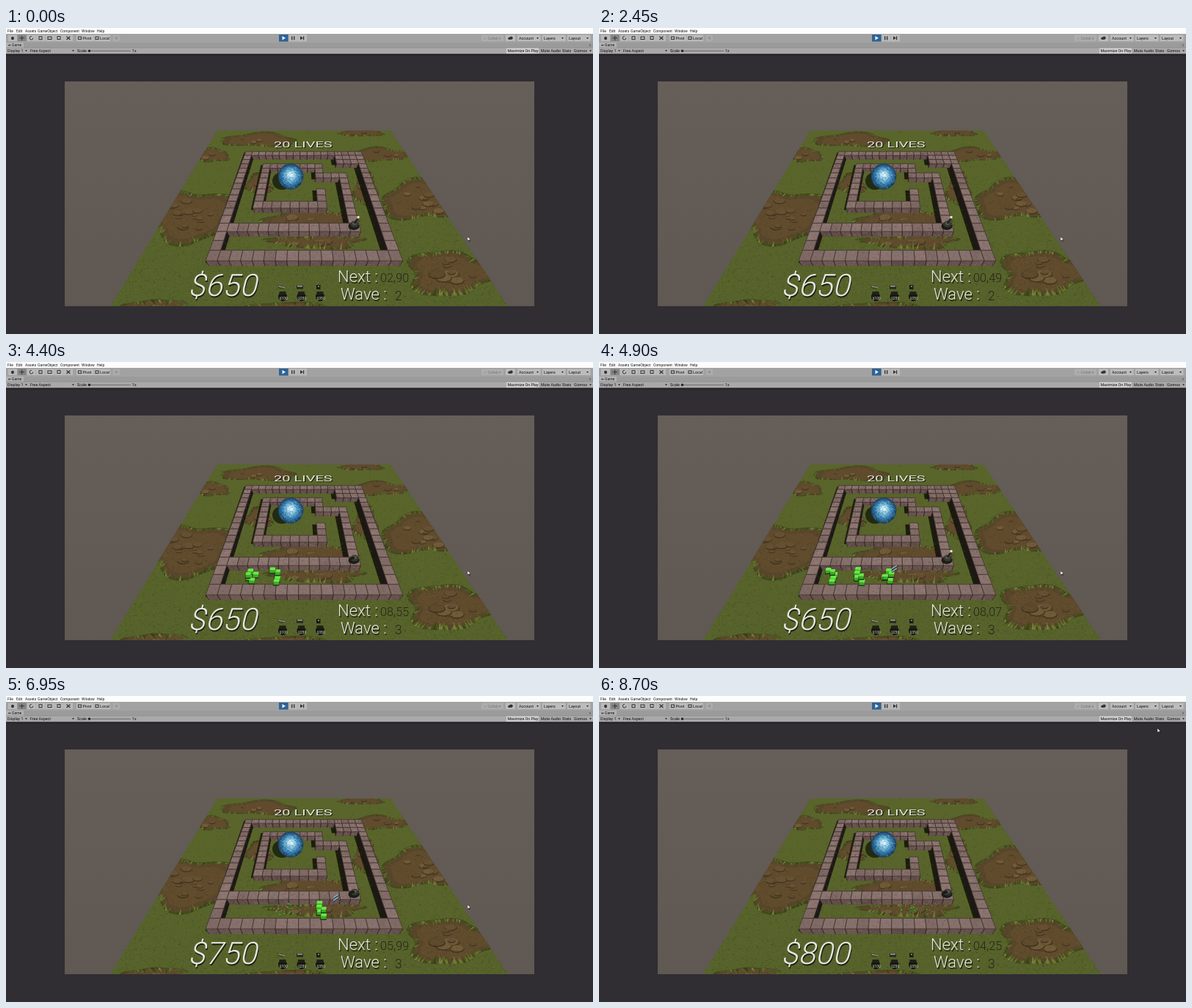
Write an HTML page with a canvas that moves like this. It is 800 by 418 pixels and loops after 8.75 s.

```html
<!DOCTYPE html>
<html lang="en">
<head>
<meta charset="utf-8">
<title>Tower defence in the editor</title>
<style>
html, body { margin: 0; width: 100%; height: 100%; overflow: hidden; background: #302e32; }
canvas { display: block; }
</style>
</head>
<body>
<canvas id="stage" width="800" height="418"></canvas>
<script>
(() => {
const LOOP = 8750, STEP = 50;
const view = document.getElementById('stage').getContext('2d');
const scene = document.createElement('canvas');
scene.width = 800;
scene.height = 418;
let g = scene.getContext('2d');

function seeded(n) {
  return () => {
    n = (n + 0x6d2b79f5) | 0;
    let k = Math.imul(n ^ (n >>> 15), 1 | n);
    k = (k + Math.imul(k ^ (k >>> 7), 61 | k)) ^ k;
    return ((k ^ (k >>> 14)) >>> 0) / 4294967296;
  };
}
const pick = (rnd, list) => list[Math.floor(rnd() * list.length)];

function box(x, y, w, h, fill) {
  g.fillStyle = fill;
  g.fillRect(x, y, w, h);
}
function poly(points, fill) {
  g.beginPath();
  points.forEach(p => g.lineTo(p[0], p[1]));
  g.closePath();
  g.fillStyle = fill;
  g.fill();
}
function oval(x, y, rx, ry, fill) {
  g.beginPath();
  g.ellipse(x, y, rx, ry, 0, 0, 7);
  g.fillStyle = fill;
  g.fill();
}
function line(x1, y1, x2, y2, color, width = 1) {
  g.beginPath();
  g.moveTo(x1, y1);
  g.lineTo(x2, y2);
  g.strokeStyle = color;
  g.lineWidth = width;
  g.stroke();
}
function label(s, x, y, size = 5, color = '#111', weight = 400) {
  g.font = `${weight} ${size}px Roboto, "Open Sans", sans-serif`;
  g.fillStyle = color;
  g.fillText(s, x, y);
}

// Linear value at time t through [time, value] pairs.
function along(keys, t) {
  if (t <= keys[0][0]) return keys[0][1];
  for (let i = 1; i < keys.length; i++) {
    const [t1, v1] = keys[i], [t0, v0] = keys[i - 1];
    if (t <= t1) return v0 + (v1 - v0) * (t - t0) / (t1 - t0);
  }
  return keys[keys.length - 1][1];
}

/* ---- editor window ---- */
function drawEditor() {
  box(0, 0, 800, 418, '#302e32');
  box(0, 0, 800, 8, '#fdfdfd');
  [['File', 2], ['Edit', 14], ['Assets', 26], ['GameObject', 43], ['Component', 74],
   ['Window', 103], ['Help', 124]].forEach(([s, x]) => label(s, x, 5.8));

  box(0, 8, 800, 12, '#a2a2a2');
  box(0, 20, 800, 7, '#9b9b9b');
  box(0, 20, 24, 7, '#b2b2b2');
  label('Game', 8, 25.4);
  line(3, 23.5, 6.5, 23.5, '#444', 1.5);
  line(796, 22, 796, 25, '#555');

  for (let i = 0; i < 6; i++) box(3 + i * 12.7, 9.5, 12.2, 8.5, i === 1 ? '#858585' : '#b9b9b9');
  oval(9, 14, 2, 2.3, '#333');
  line(18.5, 13.7, 25, 13.7, '#333');
  line(21.7, 10.8, 21.7, 17, '#333');
  g.beginPath();
  g.arc(34.5, 13.7, 2.3, 0, 5);
  g.stroke();
  g.strokeRect(45, 11.7, 4, 4);
  g.strokeRect(57, 12, 5, 3.5);
  g.strokeRect(70, 11.5, 4, 4);
  box(79, 9.5, 12, 8.5, '#b9b9b9');
  line(82.5, 16, 87.5, 11.5, '#333', 1.2);
  line(82.5, 11.5, 87.5, 16, '#333', 1.2);
  box(96, 9.5, 23, 8.5, '#bcbcbc');
  box(119.5, 9.5, 22.5, 8.5, '#bcbcbc');
  g.strokeStyle = '#444';
  g.strokeRect(98.5, 12, 4, 3.5);
  g.strokeRect(122, 12, 4, 3.5);
  label('Pivot', 104.5, 15.7, 5.4);
  label('Local', 128, 15.7, 5.4);
  box(146, 9.5, 9, 8.5, '#acacac');
  oval(150.5, 13.7, 2, 2, '#969696');

  box(372, 9, 12.6, 9.5, '#2f6294');
  box(385, 9, 12, 9.5, '#b9b9b9');
  box(397.5, 9, 12.5, 9.5, '#b9b9b9');
  poly([[376.5, 11], [381, 13.7], [376.5, 16.4]], '#e9f3ff');
  box(389, 11.3, 1.4, 5, '#333');
  box(392, 11.3, 1.4, 5, '#333');
  poly([[401, 11.3], [405, 13.7], [401, 16.2]], '#333');
  box(405, 11.3, 1.2, 5, '#333');

  box(648, 9.5, 30, 8.5, '#adadad');
  label('✓ Collab ▾', 651, 15.5, 5, '#777');
  box(681, 9.5, 13, 8.5, '#bcbcbc');
  oval(686.3, 14.3, 2.2, 1.7, '#333');
  oval(688.5, 13.6, 2.2, 2.2, '#333');
  [['Account', 697], ['Layers', 731], ['Layout', 765]].forEach(([s, x]) => {
    box(x, 9.5, 31.5, 8.5, '#bcbcbc');
    label(s, x + 2, 15.7, 5.4);
    poly([[x + 26, 13], [x + 29, 13], [x + 27.5, 15]], '#222');
  });

  box(0, 27, 800, 8.5, '#a9a9a9');
  line(0, 27, 800, 27, '#858585', 0.6);
  box(682, 27.5, 44, 7.5, '#d0d0d0');
  [['Display 1', 2], ['Free Aspect', 33], ['Scale', 97], ['1x', 172], ['Maximize On Play', 683.5],
   ['Mute Audio', 729], ['Stats', 758], ['Gizmos', 774]].forEach(([s, x]) => label(s, x, 33, 5.3));
  [26, 90, 795].forEach(x => poly([[x, 30.3], [x + 3, 30.3], [x + 1.5, 32.3]], '#222'));
  line(112, 31.3, 170, 31.3, '#666', 0.9);
  oval(113.5, 31.3, 1.7, 1.7, '#222');
  box(0, 35.5, 800, 2, '#252327');
}

/* ---- ground ---- */
const GRASS = ['#45511d', '#68752f', '#768239', '#374116', '#55622a'];

function patch(rnd, x, y, rx, ry) {
  const near = 0.45 + (y - 140) / 230;
  const edge = a => 1 + 0.13 * Math.sin(3 * a + x) + 0.09 * Math.sin(5 * a + y);
  const at = (a, k) => [x + Math.cos(a) * rx * edge(a) * k, y + Math.sin(a) * ry * edge(a) * k];
  const ring = k => Array.from({ length: 60 }, (_, i) => at(i * Math.PI / 30, k));
  poly(ring(1.08), '#414a1d');
  poly(ring(1), '#58462a');
  poly(ring(0.82), '#604b2d');
  for (let i = 0; i < rx * ry / 130; i++) {
    const [px, py] = at(rnd() * 6.3, rnd() * 0.7);
    const w = (3 + rnd() * 7) * near, h = w * 0.5;
    oval(px, py + 1, w, h, '#453621');
    oval(px, py, w * 0.9, h * 0.85, pick(rnd, ['#665033', '#705a38', '#5e4a2c']));
  }
  const blades = Math.round((rx + ry) * 1.7);
  for (let i = 0; i < blades; i++) {
    const a = rnd() * 6.283, [px, py] = at(a, 1.06);
    const len = (4 + rnd() * 7) * near;
    const lean = -Math.cos(a) * len * 0.6 + (rnd() - 0.5) * len;
    const rise = -Math.sin(a) * len * 0.75 - len * 0.15;
    const w = 0.9 * near + 0.4;
    poly([[px - w, py], [px + lean, py + rise], [px + w, py + 0.5]], pick(rnd, GRASS));
  }
}

function drawGround() {
  const rnd = seeded(12);
  g.save();
  g.beginPath();
  [[288, 140], [524, 140], [684, 380], [142, 380]].forEach(p => g.lineTo(...p));
  g.clip();
  const shade = g.createLinearGradient(0, 140, 0, 380);
  shade.addColorStop(0, '#59652a');
  shade.addColorStop(1, '#56622b');
  box(140, 140, 545, 240, shade);
  [[345, 153, 48, 9], [283, 174, 20, 9], [510, 173, 36, 9], [484, 143, 28, 5],
   [248, 256, 58, 34], [566, 236, 52, 25], [415, 262, 62, 13], [425, 292, 60, 9],
   [605, 335, 56, 29], [490, 220, 15, 22], [345, 213, 17, 14], [205, 381, 38, 10],
   [390, 385, 75, 9]].forEach(p => patch(rnd, ...p));

  for (let i = 0; i < 7000; i++) {
    const y = 140 + 240 * Math.sqrt(rnd()), x = 140 + 545 * rnd();
    box(x, y, 1 + rnd(), 0.6 + rnd() * 0.6, rnd() < 0.55 ? 'rgba(24,27,4,.17)' : 'rgba(150,160,76,.15)');
  }
  g.restore();
}

/* ---- walls ---- */
const MAZE = [[0, 16, 0, 0], [0, 0, 0, 16], [16, 16, 0, 16], [0, 16, 16, 16], [13, 15, 1, 2],
  [3, 10, 3, 3], [3, 3, 3, 10], [10, 10, 3, 5], [10, 13, 5, 5], [13, 13, 5, 13],
  [1, 13, 13, 13], [3, 10, 10, 10], [10, 10, 8, 10]];
const solid = new Set();
MAZE.forEach(([c0, c1, r0, r1]) => {
  for (let c = c0; c <= c1; c++) for (let r = r0; r <= r1; r++) solid.add(c + ',' + r);
});
const isWall = (c, r) => solid.has(c + ',' + r);

function crest(c, r) {
  const d = 8640 / (41 - r);
  return [404 + (c - 8.34) * d * 0.04394, d - 42];
}
function foot(c, r) {
  const [x, y] = crest(c, r);
  return [404 + (x - 404) * 0.965, y + 3.5 + (y + 42) * 0.01];
}
function cell(c, r, at, dx = 0, dy = 0) {
  return [at(c, r), at(c + 1, r), at(c + 1, r + 1), at(c, r + 1)].map(([x, y]) => [x + dx, y + dy]);
}

function speckle(rnd, quad, n, alpha) {
  const [a, b, c, d] = quad;
  for (let i = 0; i < n; i++) {
    const u = 0.08 + rnd() * 0.8, v = 0.1 + rnd() * 0.7;
    const mix = k => (a[k] * (1 - u) + b[k] * u) * (1 - v) + (d[k] * (1 - u) + c[k] * u) * v;
    box(mix(0), mix(1), 1.3, 0.9, rnd() < 0.5 ? `rgba(40,22,20,${alpha})` : `rgba(205,172,164,${alpha})`);
  }
}
function drawWalls() {
  const rnd = seeded(5);
  const cells = [...solid].map(k => k.split(',').map(Number));
  cells.forEach(([c, r]) => poly(cell(c, r, foot, -5, -4), 'rgba(15,16,6,.85)'));
  cells.sort((a, b) => a[1] - b[1] || Math.abs(b[0] - 8) - Math.abs(a[0] - 8));
  cells.forEach(([c, r]) => {
    const side = c < 8 ? 1 : -1, edge = c < 8 ? c + 1 : c;
    if (!isWall(c + side, r)) {
      poly([crest(edge, r), crest(edge, r + 1), foot(edge, r + 1), foot(edge, r)], '#1d1816');
    }
    if (!isWall(c, r + 1)) {
      const front = [crest(c, r + 1), crest(c + 1, r + 1), foot(c + 1, r + 1), foot(c, r + 1)];
      poly(front, pick(rnd, ['#66514e', '#6d5753', '#604c49']));
      speckle(rnd, front, 9, 0.22);
      line(...front[0], ...front[3], '#2c2220', 0.8);
      line(...front[1], ...front[2], '#2c2220', 0.8);
    }
    const face = cell(c, r, crest);
    poly(face, pick(rnd, ['#85706b', '#8b746f', '#7f6964']));
    speckle(rnd, face, 14, 0.2);
    g.strokeStyle = '#41332f';
    g.lineWidth = 0.8;
    g.stroke(new Path2D('M' + face.map(p => p.join(' ')).join('L') + 'Z'));
  });
}

function drawSphere() {
  const rnd = seeded(31);
  oval(376, 209, 13, 12, 'rgba(14,20,7,.72)');
  const glow = g.createRadialGradient(388, 200, 1, 388, 203, 17.5);
  [[0, '#e3f8ff'], [0.22, '#a6dcf2'], [0.5, '#4f9ac4'], [0.8, '#286493'], [1, '#163a57']]
    .forEach(([k, color]) => glow.addColorStop(k, color));
  oval(388, 203, 17.3, 17.5, glow);
  for (let i = 0; i < 330; i++) {
    const a = rnd() * 6.3, d = 16 * Math.sqrt(rnd());
    box(388 + Math.cos(a) * d, 203 + Math.sin(a) * d, 1.2, 1,
      rnd() < 0.55 ? 'rgba(8,36,64,.3)' : 'rgba(190,236,255,.24)');
  }
}

/* ---- texts in the world ---- */
function raised(s, x, y, size, weight, skew = 0, tall = 1) {
  g.save();
  g.transform(1, 0, skew, tall, x, y);
  label(s, 1.2, 1.5, size, 'rgba(18,20,10,.85)', weight);
  label(s, 0, 0, size, '#e6e6e1', weight);
  g.restore();
}
function drawShop() {
  ['$100', '$250', '$350'].forEach((price, i) => {
    const x = 377 + i * 25.5;
    oval(x, 367, 6, 6.2, '#17180f');
    box(x - 4.5, 360, 9, 4, '#202118');
    label(price, x - 4.5, 370.5, 5, '#d8d8d0');
  });
  oval(375.5, 354, 4.5, 1.5, '#26271d');
  line(372, 353.4, 380, 354.4, '#a5a69d', 1.3);
  box(396, 351.5, 9, 5, '#25261d');
  box(397, 351.8, 7, 1.8, '#96978e');
  box(423, 351, 5.5, 6, '#1c1d16');
  box(425, 352, 2, 2, '#77786f');
}

function drawScene() {
  drawEditor();
  const sky = g.createLinearGradient(0, 73, 0, 380);
  sky.addColorStop(0, '#655e59');
  sky.addColorStop(0.45, '#625b56');
  sky.addColorStop(1, '#5f5853');
  box(80, 73, 640, 307, sky);
  g.save();
  g.beginPath();
  g.rect(80, 73, 640, 307);
  g.clip();
  drawGround();
  drawWalls();
  drawSphere();
  raised('20 LIVES', 365, 163.3, 20, 400, 0, 0.57);
  raised('Next :', 452, 347, 22, 300);
  raised('Wave :', 456, 371, 22, 300);
  drawShop();
  g.restore();
}

/* ---- moving parts ---- */
const COUNT = [[0, 2.9], [2450, 0.49], [2925, 0.01]];
const COUNT_NEXT = [[2926, 10], [3800, 9.12], [4900, 8.07], [5950, 6.99], [6950, 5.99], [8700, 4.25]];
const FOES = [
  { born: 3150, path: [[3150, 305], [3800, 337], [4950, 397]], shot: 4500, dies: 4950 },
  { born: 3550, path: [[3550, 305], [3800, 313], [4900, 353], [5500, 385]], shot: 5050, dies: 5500 },
  { born: 4650, path: [[4650, 305], [4900, 318], [5950, 375], [7080, 435]], shot: 6820, dies: 7080 }
];
const MOUSE_X = [[7500, 629], [7900, 788], [8100, 757], [8400, 761]];
const MOUSE_Y = [[7500, 287], [7900, 178], [8100, 124], [8400, 46]];

function cube(x, y, w) {
  box(x - w / 2 - 0.7, y + 1, w + 1, 5, '#17350d');
  box(x - w / 2, y, w, 4.6, '#3fa82b');
  poly([[x - w / 2, y + 0.5], [x - w / 2 + 1, y - 3], [x + w / 2 + 0.5, y - 3], [x + w / 2, y + 1]], '#6ce849');
}
function drawFoe(foe, i, t) {
  const x = along(foe.path, t), turn = t / 190 + i * 2;
  [-7, -2, 3, 8].forEach((dy, k) => {
    const sway = Math.sin(turn + k * 1.9);
    cube(x + sway * 3.6 + (k % 2 ? 2 : -2), 291 + dy + Math.cos(turn + k) * 1.2, 7.6);
  });
  cube(x - Math.cos(turn) * 5, 290 + Math.sin(turn) * 4, 6.5);
}
function drawBurst(foe, i, t) {
  const age = (t - foe.dies) / 1950;
  if (age < 0 || age > 1) return;
  const rnd = seeded(70 + i), x = foe.path[foe.path.length - 1][1];
  const spread = 1 - Math.pow(1 - Math.min(1, age * 3), 3);
  for (let k = 0; k < 48; k++) {
    const a = rnd() * 6.283, d = Math.sqrt(rnd());
    const px = x - 3 + Math.cos(a) * d * 31 * spread;
    const hop = Math.sin(Math.min(1, age * 4) * Math.PI) * 5 * rnd();
    const py = 291 + Math.sin(a) * d * 8 * spread - hop;
    const size = (1.5 + rnd() * 2) * (1 - age * 0.6);
    const fades = rnd(), tint = rnd() < 0.5 ? '#5fdc42' : '#42b92e';
    if (fades < age * 0.55) continue;
    box(px, py + 0.5, size, size, '#1e6a17');
    box(px, py, size, size * 0.7, tint);
  }
}
function drawShot(foe, t) {
  if (t < foe.shot || t >= foe.dies) return;
  const k = (t - foe.shot) / (foe.dies - foe.shot);
  const x = 472 + (along(foe.path, t) - 472) * k;
  const y = 266 + 18 * k;
  [-2, 2].forEach(d => {
    line(x - 4, y + 3 + d, x + 4, y - 2 + d, '#273842', 2.2);
    line(x - 4, y + 2.5 + d, x + 3, y - 2 + d, '#a7c9d6', 1.2);
  });
}
function drawTurret(t) {
  oval(474, 271, 7.5, 5, '#1b1c18');
  oval(475, 268, 5.5, 4.5, '#34352f');
  oval(475, 267, 3, 2.2, '#57584f');
  const aiming = (t >= 3650 && t < 4500) || t >= 6350;
  if (aiming) {
    line(475, 267, 469, 269, '#1a1b18', 3);
  } else {
    line(475, 267, 479, 261, '#24251f', 3);
    box(478.5, 257, 3, 2.8, '#eeeee6');
  }
}
function drawPointer(x, y) {
  poly([[x, y - 2], [x, y + 4.5], [x + 1.6, y + 3], [x + 2.8, y + 5], [x + 3.6, y + 4.4],
    [x + 2.7, y + 2.6], [x + 4.5, y + 2.4]], '#111');
  poly([[x + 0.2, y - 1.4], [x + 0.3, y + 3.5], [x + 1.6, y + 2.3], [x + 2.8, y + 4.2],
    [x + 2.3, y + 2], [x + 3.7, y + 2]], '#fff');
}

function render(t) {
  g = view;
  g.drawImage(scene, 0, 0);
  drawTurret(t);
  FOES.forEach((foe, i) => drawBurst(foe, i, t));
  FOES.forEach((foe, i) => {
    if (t >= foe.born && t < foe.dies) drawFoe(foe, i, t);
    drawShot(foe, t);
  });
  const cash = 650 + 50 * FOES.filter(foe => t >= foe.dies).length;
  raised('$' + cash, 248, 366, 42, 300, -0.24);
  const left = along(t < 2926 ? COUNT : COUNT_NEXT, t);
  label(left.toFixed(2).padStart(5, '0').replace('.', ','), 510, 347, 16.3, '#24261b', 300);
  label(t < 2926 ? '2' : '3', 530, 371.5, 17.5, '#24261b', 300);
  drawPointer(along(MOUSE_X, t), along(MOUSE_Y, t));
}

drawScene();
function tick() {
  const t = performance.now() % LOOP;
  render(Math.floor(t / STEP) * STEP);
  requestAnimationFrame(tick);
}
tick();
})();
</script>
</body>
</html>
```
